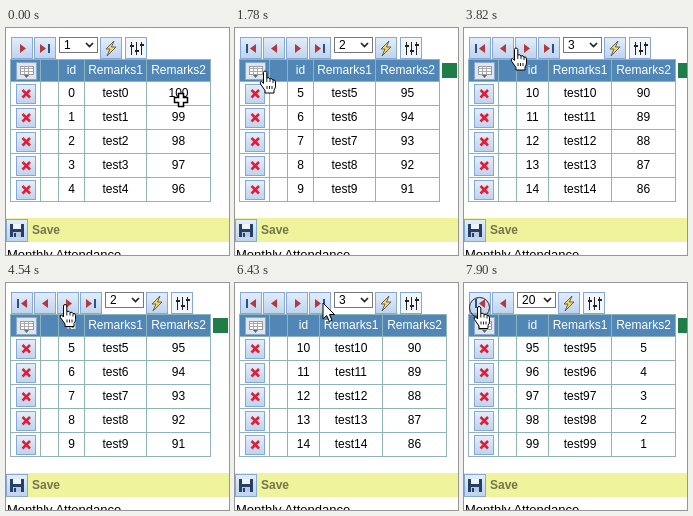
An HTML page for the animation above (7.99 s loop, 223 by 227 pixels).

```html
<!DOCTYPE html>
<html lang="en">
<head>
<meta charset="utf-8">
<title>Paged grid</title>
<style>
html, body { margin: 0; width: 100%; height: 100%; overflow: hidden; background: #fff; }
svg { display: block; width: 223px; height: 227px; font: 12px "Liberation Sans", Arial, sans-serif; }
.crisp { shape-rendering: crispEdges; }
.mid { text-anchor: middle; }
</style>
</head>
<body>
<svg id="stage" viewBox="0 0 223 227">
  <defs>
    <linearGradient id="face" x2="0" y2="1">
      <stop offset="0" stop-color="#e3eefb"/>
      <stop offset="1" stop-color="#bdd3ee"/>
    </linearGradient>
    <g id="hand">
      <path d="M-1.5 1.5Q-1.5 0 0 0T1.8 1.5V7Q4.5 6 5 8Q7.5 7 8 9Q10.5 8.500 10.500 11V15Q10.500 17 9 19V22H0V19.500L-4.500 13Q-5.500 10.500 -3.500 10.500L-1.500 12.500Z" fill="#fff" stroke="#000"/>
      <path d="M1.800 7V11M5 8V11M8 9V12M2 15V18M4.500 15V18M7 15V18" stroke="#000" stroke-width=".9"/>
    </g>
    <path id="arrow" d="M0 0V16L3.700 12.500L6.300 18.500L9 17.300L6.500 11.500H11.500Z" fill="#fff" stroke="#000"/>
    <path id="cross" d="M-2.500-6.500H2.500V-2.500H6.500V2.500H2.500V6.500H-2.500V2.500H-6.500V-2.500H-2.500Z" fill="#fff" stroke="#000" stroke-width="1.500"/>
  </defs>
  <g id="page"></g>
  <rect class="crisp" y="190" width="223" height="24" fill="#eff39b"/>
  <g id="save"></g>
  <text x="26" y="206" font-weight="bold" fill="#74744e">Save</text>
  <text x="1" y="231" font-size="13">Monthly Attendance</text>
  <circle id="ring" r="10" fill="none" stroke="#222"/>
  <use id="cursor"/>
</svg>
<script>
const LOOP = 7990;
const $ = id => document.getElementById(id);

// time, page
const pages = [[0, 1], [1400, 2], [2400, 3], [4120, 2], [5310, 3], [6490, 20]];
// time, export icon visible
const exports = [[0, 0], [650, 1], [3900, 0], [4120, 1], [6000, 0], [6800, 1]];
// from, to, x, y
const clicks = [
  [1330, 1480, 17, 18.5], [2330, 2470, 62, 17.5], [4050, 4200, 49, 19.5],
  [5240, 5370, 67, 23.5], [6490, 6710, 88, 19], [7900, 7990, 15.5, 24.5]
];
// time, x, y, shape from here on
const path = [
  [0, 175, 72, 'cross'], [500, 175, 72, 'cross'], [1000, 30, 36, 'hand'], [1170, 16, 20, 'hand'],
  [1480, 16, 20, 'hand'], [1780, 30, 43, 'hand'], [2080, 62, 16, 'hand'],
  [2560, 62, 16, 'hand'], [2680, 69, 44, 'cross'], [2740, 70, 53, 'cross'],
  [2990, 70, 53, 'cross'], [3120, 68, 37, 'cross'], [3180, 70, 45, 'cross'],
  [3280, 70, 45, 'cross'], [3400, 58, 26, 'hand'], [3470, 52, 20, 'hand'],
  [3820, 52, 20, 'hand'], [3900, 48, 19, 'hand'], [4250, 48, 19, 'hand'], [4750, 67, 23, 'hand'],
  [5310, 67, 23, 'hand'], [5380, 75, 44, 'cross'], [5450, 82, 59, 'cross'],
  [5740, 82, 59, 'cross'], [6200, 84, 30, 'hand'], [6430, 88, 20, 'arrow'],
  [6650, 88, 20, 'arrow'], [6800, 90, 51, 'cross'],
  [7240, 90, 51, 'cross'], [7400, 50, 42, 'cross'], [7500, 18, 31, 'hand'],
  [7580, 6, 26, 'hand'], [7660, 15, 23.5, 'hand'], [LOOP, 15, 23.5, 'hand']
];

const rect = (x, y, w, h, fill, extra = '') =>
  `<rect class="crisp" x="${x}" y="${y}" width="${w}" height="${h}" fill="${fill}" ${extra}/>`;
const shape = (d, extra) => `<path d="${d}" ${extra}/>`;
const label = (x, y, s, extra = '') => `<text class="mid" x="${x}" y="${y}" ${extra}>${s}</text>`;
const button = (x, y, w, h, icon, fill = 'url(#face)') =>
  `<g transform="translate(${x} ${y})">${rect(.5, .5, w - 1, h - 1, fill, 'stroke="#86a8d2"')}${icon}</g>`;

const red = 'fill="#b5383c"', navy = '#2f4f8f';
const right = x => shape(`M${x} 7l6 4.500l-6 4.500z`, red);
const left = x => shape(`M${x} 7l-6 4.500l6 4.500z`, red);
const icons = {
  first: rect(6, 7, 2, 9, navy) + left(16),
  prev: left(14),
  next: right(9),
  last: right(6) + rect(14, 7, 2, 9, navy),
  bolt: shape('M14 4L6 12H10L7 19L16 10H11.500Z', 'fill="#f7d75a" stroke="#555" stroke-width=".9"'),
  tune: shape('M6.500 5V18M11.500 5V18M16.500 5V18', 'stroke="#222"') +
    rect(5, 8, 4, 2, '#222') + rect(10, 13, 4, 2, '#222') + rect(15, 7, 4, 2, '#222'),
  del: shape('M6.500 6L14 13.500M14 6L6.500 13.500', 'stroke="#e01d35" stroke-width="2.500"'),
  grid: rect(4, 4, 13, 8, '#fff', 'stroke="#9a9a9a"') +
    shape('M4 6.500H17M4 9.500H17M8.500 4V12M12.500 4V12', 'stroke="#aaa"') + shape('M8 13h5l-2.500 3z', 'fill="#666"'),
  disk: rect(4, 5, 14, 13, '#263f66') + rect(7, 5, 8, 5, '#eef4fb') + rect(7, 13, 8, 5, '#b9c9de') + rect(8, 14, 2, 4, '#263f66')
};

function toolbar(page) {
  const names = [...(page > 1 ? ['first', 'prev'] : []), ...(page < 20 ? ['next', 'last'] : [])];
  const x = names.length * 23 + 7;
  return names.map((n, i) => button(5 + i * 23, 9, 22, 22, icons[n])).join('') +
    rect(x + .5, 9.5, 38, 15, '#fff', 'stroke="#777"') +
    `<text x="${x + 5}" y="21">${page}</text>` +
    shape(`M${x + 27} 15l3.500 3.500l3.500-3.500`, 'fill="none" stroke="#222" stroke-width="1.700"') +
    button(x + 41, 9, 22, 22, icons.bolt) +
    button(x + 66, 9, 22, 22, icons.tune, '#f1f6fd');
}

function table(page, hasExport) {
  const wide = page > 2;
  const cols = wide ? [4, 34, 52, 84, 147, 211] : [4, 34, 52, 78, 140, 204];
  const end = cols[5];
  const mid = i => (cols[i] + cols[i + 1]) / 2 + .5;
  let out = rect(4, 31, end - 4, 22, '#5087b7');
  out += cols.map(x => rect(x, 31, 1, 142, '#8fb3b8')).join('');
  for (let i = 0; i < 7; i++) out += rect(4, i ? 29 + i * 24 : 31, end - 3, 1, '#8fb3b8');
  out += button(10, 34, 21, 18, icons.grid, '#dfe6ee');
  ['id', 'Remarks1', 'Remarks2'].forEach((s, i) => out += label(mid(i + 2), 46, s, 'fill="#fff"'));
  for (let r = 0; r < 5; r++) {
    const n = (page - 1) * 5 + r, y = 69 + r * 24;
    out += button(10, y - 13, 20, 20, icons.del);
    [n, 'test' + n, 100 - n].forEach((s, i) => out += label(mid(i + 2), y, s));
  }
  if (hasExport) out += rect(end + 3, 35, 15, 15, '#1f7d48');
  return out;
}

const at = (list, t) => list.filter(k => k[0] <= t).pop();

function pointer(t) {
  const q = Math.floor(t / 10) * 10;
  const i = path.findIndex(k => k[0] > q);
  const a = path[i - 1], b = path[i];
  // the pointer advances in short hops
  const hops = Math.max(1, Math.round((b[0] - a[0]) / 70));
  const f = Math.floor((q - a[0]) / (b[0] - a[0]) * hops + 1e-6) / hops;
  const mix = j => Math.round((a[j] + (b[j] - a[j]) * f) * 2) / 2;
  return [mix(1), mix(2), f > .5 ? b[3] : a[3]];
}

let shown = '';
function draw(now) {
  const t = now % LOOP;
  const page = at(pages, t)[1], hasExport = at(exports, t)[1];
  const key = page + '/' + hasExport;
  if (key !== shown) {
    $('page').innerHTML = table(page, hasExport) + toolbar(page);
    shown = key;
  }
  const [x, y, kind] = pointer(t);
  $('cursor').setAttribute('href', '#' + kind);
  $('cursor').setAttribute('transform', `translate(${x} ${y})`);
  const hit = clicks.find(c => t >= c[0] && t < c[1]);
  $('ring').style.display = hit ? '' : 'none';
  if (hit) $('ring').setAttribute('transform', `translate(${hit[2]} ${hit[3]})`);
}

$('save').innerHTML = button(0, 191, 22, 23, icons.disk);
const start = performance.now();
function tick() {
  draw(performance.now() - start);
  requestAnimationFrame(tick);
}
tick();
</script>
</body>
</html>
```
